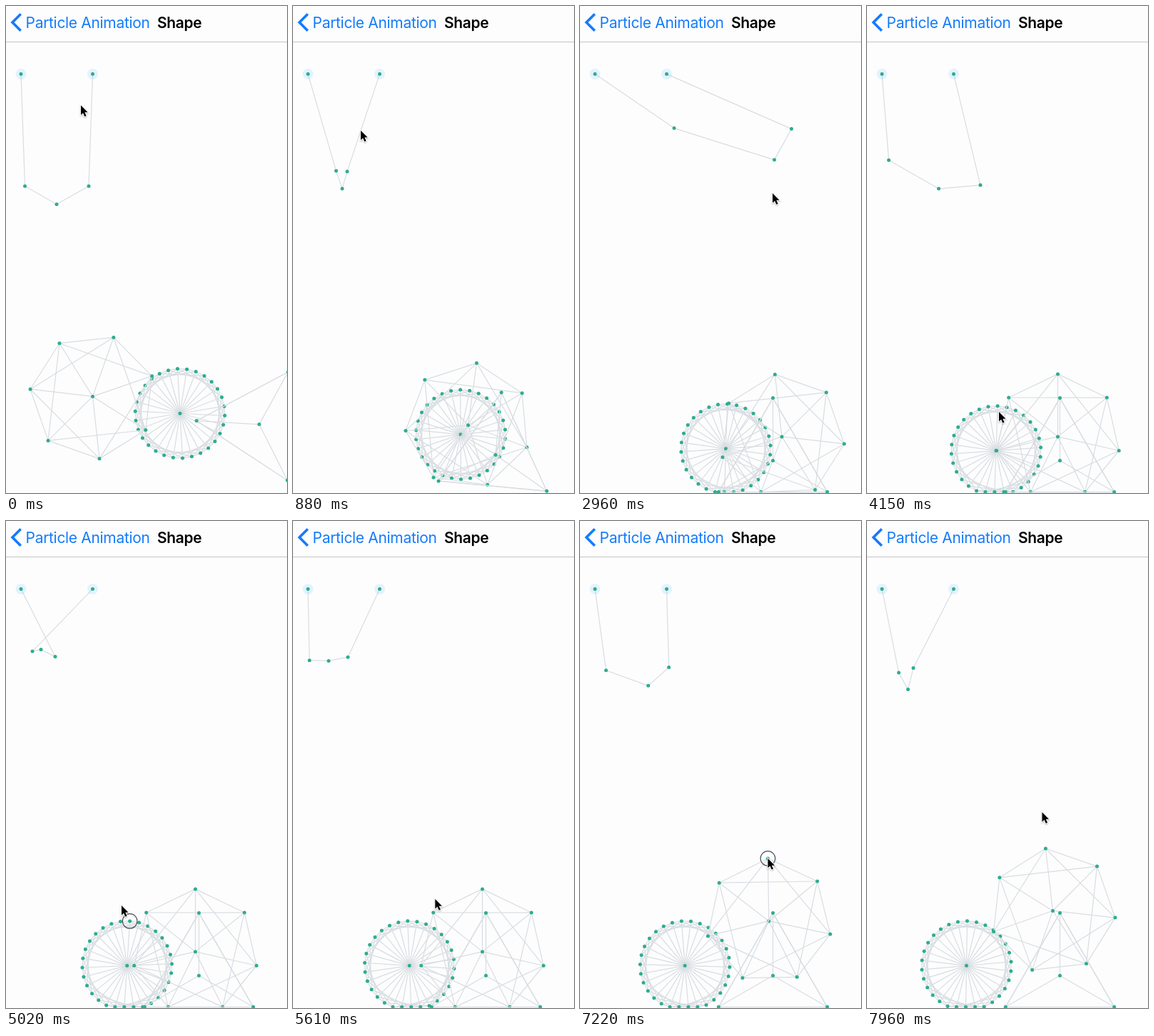
Recreate the animation shown at these times as an HTML page with a canvas. Size 394x684 px, loop 8 s.

```html
<!DOCTYPE html>
<html lang="en">
<head>
<meta charset="utf-8">
<title>Particle Animation</title>
<style>
  html, body { margin: 0; width: 100%; height: 100%; overflow: hidden; background: #fdfdfd; }
  canvas, svg { position: absolute; left: 0; top: 0; width: 394px; height: 684px; }
  text { font: 21px Inter, Roboto, sans-serif; letter-spacing: -0.32px; }
</style>
</head>
<body>
<svg viewBox="0 0 394 684">
  <path d="M0 50.5H394" stroke="#c4c4c6"/>
  <path d="M20.7 11.3L9 23L20.7 34.7" fill="none" stroke="#147bfc" stroke-width="3.6"/>
  <text x="27.6" y="30.7" fill="#147bfc">Particle Animation</text>
  <text x="211.9" y="30.7" style="font-weight:600">Shape</text>
</svg>
<canvas id="stage"></canvas>
<script>
const W = 394, H = 684, LOOP = 8000, TICK = 147.5;
const FLOOR = 683, WALL = 395.5, GRAVITY = 7.29;
const GRAB = 47, RELEASE = 51.5;
const canvas = document.getElementById('stage');
const ctx = canvas.getContext('2d');
const dpr = window.devicePixelRatio || 1;
canvas.width = W * dpr;
canvas.height = H * dpr;

// Key poses: tick, then values.
const ROPE = [
  [0, 26.5, 253.5, 71, 279, 116, 253.5],
  [12, 66, 204, 71, 227.5, 76.5, 204],
  [18, 128, 125, 255, 138, 375, 85],
  [20, 132, 172, 272.5, 216.5, 296.5, 173],
  [25, 4, 215, 50, 246, 85, 240],
  [28, 30.5, 217, 100.5, 257, 159, 252],
  [34, 69, 191, 49, 181, 37, 183.5],
  [43, 75.5, 205.5, 92.5, 223.5, 77, 204],
  [54, 44.5, 213.5, 57.5, 237, 65, 207]
];
const WHEEL = [
  [0, 244, -93.2], [12, 225, -111.6], [20, 204.5, -124.1],
  [28, 181, -148.1], [54, 139.5, -185.1]
];
const HEPTAGON = [
  [0, 121.5, -70.5], [12, 320, 75.3], [20, 283, 58], [28, 267.5, 64.3],
  [34, 265.5, 64.3], [GRAB, 265.5, 64.3], [54, 260.5, 57.7]
];
const POINTER = [
  [0, 105, 140], [12, 89, 196.5], [18, 375, 85], [20, 270, 263.5],
  [28, 185, 570.5], [34, 162, 540.5], [43, 251.5, 519],
  [RELEASE, 245.5, 409.5], [54, 245.5, 409.5]
];

const mix = (a, b, u) => a + (b - a) * u;
const clamp01 = u => Math.min(1, Math.max(0, u));
const smooth = u => u * u * (3 - 2 * u);

// Monotone cubic through the rows.
function track(rows, t) {
  const last = rows.length - 1;
  if (t >= rows[last][0]) return rows[last].slice(1);
  let i = 0;
  while (t >= rows[i + 1][0]) i++;
  const a = rows[i], b = rows[i + 1], span = b[0] - a[0], u = (t - a[0]) / span;
  const slope = (j, c) => (rows[j + 1][c] - rows[j][c]) / (rows[j + 1][0] - rows[j][0]);
  const tangent = (j, c) => {
    if (j === 0) return slope(0, c);
    if (j === last) return slope(last - 1, c);
    const p = slope(j - 1, c), q = slope(j, c);
    return p * q <= 0 ? 0 : 2 * p * q / (p + q);
  };
  return a.slice(1).map((v, k) => {
    const c = k + 1, w = 1 - u;
    return mix(v, b[c], smooth(u))
      + span * u * w * (tangent(i, c) * w - tangent(i + 1, c) * u);
  });
}

// Height above the floor: each bounce lasts `keep` times the one before.
function hop(t, hit, length, keep) {
  while (t > hit && length > 0.1) {
    length *= keep;
    hit += length;
  }
  return t > hit ? 0 : GRAVITY * (t - hit + length) * (hit - t);
}

// Natural swing of the three free rope particles, as x, y offsets.
function swing(t) {
  const squeeze = 20 * Math.cos(0.639 * (t - 34) + 0.12);
  const sway = 0.35 * t * Math.cos(0.346 * (t - 34) + 2.08);
  return [sway + squeeze, 0, sway * Math.SQRT2, 0, sway - squeeze, 0];
}

const ROPE_REST = ROPE.map(([t, ...v]) => {
  const s = swing(t);
  return [t, ...v.map((n, i) => n - s[i])];
});

function makeRope(t) {
  const s = swing(t);
  const v = track(ROPE_REST, t).map((n, i) => Math.max(0, n + s[i]));
  const dots = [[21, 96], v.slice(0, 2), v.slice(2, 4), v.slice(4), [121.5, 96]];
  return {
    dots,
    links: dots.slice(1).map((p, i) => [dots[i], p]),
    pins: [dots[0], dots[4]]
  };
}

function makeTire(x, y, deg, radius, count) {
  const rim = Array.from({ length: count }, (_, i) => {
    const a = deg * Math.PI / 180 + i * 2 * Math.PI / count;
    return [
      Math.min(WALL, x + radius * Math.cos(a)),
      Math.min(FLOOR, y + radius * Math.sin(a))
    ];
  });
  const hub = [x, y], links = [];
  rim.forEach((p, i) => links.push(
    [p, rim[(i + 1) % count]], [p, hub], [p, rim[(i + 5) % count]]));
  return { dots: [...rim, hub], links };
}

function makeWheel(t) {
  const [x, deg] = track(WHEEL, t);
  return makeTire(x, 625 - hop(t, 2.52, 5.37, 0.815), deg, 62.8, 30);
}

function makeHeptagon(t) {
  const [x, deg] = track(HEPTAGON, t);
  const lift = 103 * smooth(clamp01((t - GRAB) / (RELEASE - GRAB)))
    - GRAVITY * Math.max(0, t - RELEASE) ** 2;
  return makeTire(x, 605.3 - hop(t, 2.72, 5.57, 0.71) - lift, deg, 88, 7);
}

function makeTriangle(t) {
  const u = 1 - (1 - clamp01(t / 10)) ** 2;
  return makeTire(mix(355, 270.5, u), mix(588, 639, u), mix(183.3, 150, u), 88, 3);
}

function circle(p, r) {
  ctx.beginPath();
  ctx.arc(p[0], p[1], r, 0, 2 * Math.PI);
}

function disc(p, r, color) {
  ctx.fillStyle = color;
  circle(p, r);
  ctx.fill();
}

function drawBody({ dots, links, pins = [] }) {
  ctx.strokeStyle = '#d8dde2';
  for (const [a, b] of links) {
    ctx.beginPath();
    ctx.moveTo(...a);
    ctx.lineTo(...b);
    ctx.stroke();
  }
  pins.forEach(p => disc(p, 7.5, 'rgba(0,153,255,0.1)'));
  dots.forEach(p => disc(p, 2.5, '#2dad8f'));
}

function drawRing(p) {
  ctx.strokeStyle = '#4f545c';
  circle(p, 10.3);
  ctx.stroke();
}

const arrow = new Path2D('M0 0V13.4L3.1 10.6L5.3 15.6L7.6 14.6L5.4 9.7H9.6Z');
function drawPointer([x, y]) {
  ctx.save();
  ctx.translate(x, y);
  ctx.shadowColor = 'rgba(0,0,0,0.3)';
  ctx.shadowBlur = 2 * dpr;
  ctx.shadowOffsetY = dpr;
  ctx.lineWidth = 1.8;
  ctx.strokeStyle = '#fff';
  ctx.stroke(arrow);
  ctx.shadowColor = 'transparent';
  ctx.fillStyle = '#000';
  ctx.fill(arrow);
  ctx.restore();
}

function draw(t) {
  ctx.setTransform(dpr, 0, 0, dpr, 0, 0);
  ctx.clearRect(0, 0, W, H);
  ctx.translate(0, -0.4);
  ctx.lineWidth = 1.2;
  const rope = makeRope(t), wheel = makeWheel(t), heptagon = makeHeptagon(t);
  [rope, wheel, heptagon, makeTriangle(t)].forEach(drawBody);

  // A dragged particle sits under the pointer; a touched one is only ringed.
  let held = null;
  if (t >= 13 && t <= 18) held = rope.dots[3];
  if (t >= GRAB && t <= RELEASE) held = heptagon.dots[4];
  const touched = t >= 33 && t <= 35 ? wheel.dots[6] : held;
  if (touched) drawRing(touched);
  drawPointer(held || track(POINTER, t));
}

function frame(now) {
  draw(Math.floor((now % LOOP) / TICK + 0.08));
  requestAnimationFrame(frame);
}
requestAnimationFrame(frame);
</script>
</body>
</html>
```
